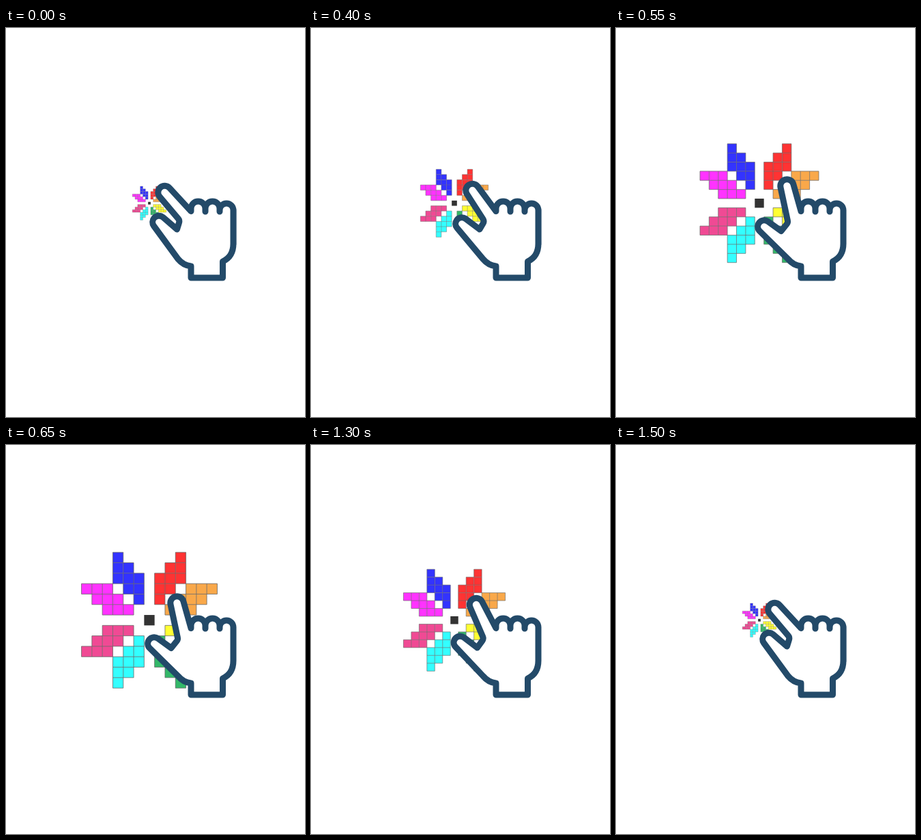
An HTML page with a canvas for the animation above (1.55 s loop, 438 by 570 pixels).

```html
<!DOCTYPE html>
<html lang="en">
<head>
<meta charset="utf-8">
<title>Pinch to zoom</title>
<style>
  html, body { margin: 0; width: 100%; height: 100%; overflow: hidden; background: #fff; }
  canvas { display: block; }
</style>
</head>
<body>
<canvas id="stage" width="438" height="570"></canvas>
<script>
const ctx = document.getElementById('stage').getContext('2d');
const LOOP = 1550;

// [start time, zoom level]
const STEPS = [
  [0, 0], [300, 1], [400, 2], [450, 3], [500, 4], [550, 5], [650, 6],
  [1250, 5], [1300, 4], [1350, 3], [1400, 2], [1450, 1], [1500, 0]
];

// One quarter of the flower; the others are mirrored.
const QUARTER = [
  '...A..',
  '...AA.',
  '...AAA',
  'BBB.AA',
  '.BBB.A',
  '..BBB.'
];
const QUARTER_COLORS = [
  { flipX: false, flipY: false, A: '#3333ff', B: '#ff33ff' },
  { flipX: true, flipY: false, A: '#ff3333', B: '#f9a84a' },
  { flipX: false, flipY: true, A: '#33ffff', B: '#f04a94' },
  { flipX: true, flipY: true, A: '#33b869', B: '#ffff33' }
];

const POSES = [
  { tip: [232.5, 241], bend: [254.5, 282], crotch: [250.5, 295], thumb: [224, 284.5] },
  { tip: [236.5, 238], bend: [254, 283], crotch: [247, 295], thumb: [221, 287] },
  { tip: [242, 234], bend: [253, 284], crotch: [243.5, 297], thumb: [218.5, 289.5] },
  { tip: [250.5, 231.5], bend: [252, 285], crotch: [242, 297.5], thumb: [217, 291] }
];

function drawFlower(level) {
  const size = 49.5 + 24.9 * level;
  const cell = size / 13;
  const left = 210 - size / 2;
  const top = 256.7 - size / 2;

  ctx.lineWidth = 1;
  ctx.lineJoin = 'miter';
  ctx.strokeStyle = `rgba(100, 100, 100, ${0.3 + 0.08 * level})`;
  for (const colors of QUARTER_COLORS) {
    QUARTER.forEach((line, row) => [...line].forEach((key, col) => {
      if (key === '.') return;
      const x = left + cell * (colors.flipX ? 12 - col : col);
      const y = top + cell * (colors.flipY ? 12 - row : row);
      ctx.fillStyle = colors[key];
      ctx.fillRect(x, y, cell, cell);
    }));
  }

  // Lines go over all fills; each shared edge is stroked once.
  const isFilled = (col, row) =>
    QUARTER[Math.min(row, 12 - row)]?.[Math.min(col, 12 - col)] in QUARTER_COLORS[0];
  ctx.beginPath();
  for (let row = 0; row <= 13; row++) {
    for (let col = 0; col <= 13; col++) {
      const x = left + cell * col, y = top + cell * row;
      if (isFilled(col, row) || isFilled(col, row - 1)) {
        ctx.moveTo(x, y);
        ctx.lineTo(x + cell, y);
      }
      if (isFilled(col, row) || isFilled(col - 1, row)) {
        ctx.moveTo(x, y);
        ctx.lineTo(x, y + cell);
      }
    }
  }
  ctx.stroke();

  ctx.fillStyle = '#333';
  ctx.fillRect(left + 6 * cell, top + 6 * cell, cell, cell);
}

// Angle at which the line from a point touches a circle.
function tangent([px, py], [cx, cy], radius, side) {
  const dx = px - cx, dy = py - cy;
  return Math.atan2(dy, dx) + side * Math.acos(radius / Math.hypot(dx, dy));
}

function fingertip(center, radius, from, to) {
  ctx.arc(...center, radius, tangent(from, center, radius, -1),
    tangent(to, center, radius, 1), true);
}

function drawHand({ tip, bend, crotch, thumb }, hasEdge) {
  const knuckle = [271, 268.5];
  const palm = [252, 338.5];

  if (hasEdge) {
    ctx.fillStyle = '#dce3ea';
    ctx.fillRect(337, 265, 1.5, 53);
  }

  ctx.beginPath();
  ctx.moveTo(271, 366);
  ctx.lineTo(317.5, 366);
  ctx.lineTo(317.5, 342);
  ctx.quadraticCurveTo(333, 335, 333, 316);
  ctx.arc(323, 267, 10, 0, Math.PI, true);
  ctx.lineTo(313, 269);
  ctx.arc(302.5, 264.5, 10.5, 0, Math.PI, true);
  ctx.lineTo(292, 269);
  ctx.arc(281.5, 264.5, 10.5, 0, Math.PI, true);
  ctx.lineTo(...knuckle);
  fingertip(tip, 9.7, knuckle, bend);
  ctx.arcTo(...bend, ...crotch, 6);
  ctx.lineTo(...crotch);
  fingertip(thumb, 9.3, crotch, palm);
  ctx.lineTo(...palm);
  ctx.quadraticCurveTo(260, 348, 271, 349);
  ctx.closePath();

  ctx.fillStyle = '#fff';
  ctx.fill();
  ctx.lineWidth = 9;
  ctx.lineJoin = 'round';
  ctx.strokeStyle = '#234a69';
  ctx.stroke();
}

function render(now) {
  const time = now % LOOP;
  const level = STEPS.filter(([start]) => start <= time).pop()[1];
  const pose = Math.ceil(level / 2);
  ctx.fillStyle = '#fff';
  ctx.fillRect(0, 0, 438, 570);
  drawFlower(level);
  drawHand(POSES[pose], pose < 2);
}

const begin = performance.now();
function tick() {
  render(performance.now() - begin);
  requestAnimationFrame(tick);
}
tick();
</script>
</body>
</html>
```
